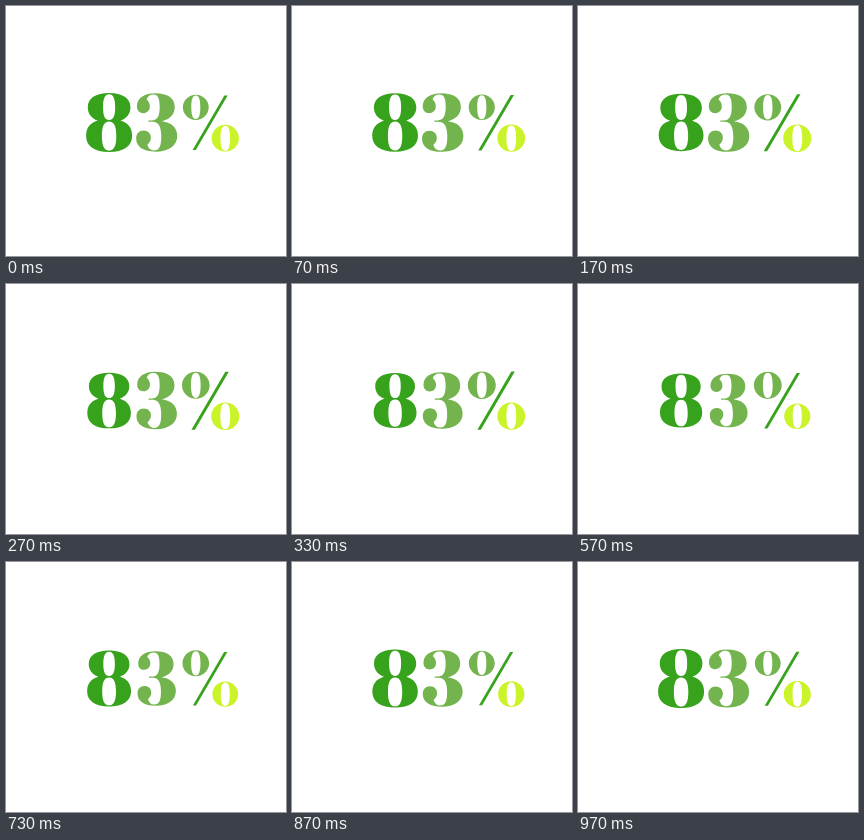
Animation of 280x250 px, one loop 1000 ms. Source, as an HTML page with a canvas:

```html
<!DOCTYPE html>
<html lang="en">
<head>
<meta charset="utf-8">
<title>83%</title>
<style>
  html, body { margin: 0; width: 100%; height: 100%; overflow: hidden; background: #fff; }
  canvas { display: block; }
</style>
</head>
<body>
<canvas id="stage" width="280" height="250" role="img" aria-label="83%"></canvas>
<script>
const ctx = document.getElementById('stage').getContext('2d');
const PERIOD = 1000;
const LAG = 0.112;
const LEAD = 0.012;
const SWING = 0.046;
const GREEN = '#37a21c', SAGE = '#74b44f', LIME = '#caf429';

// Closed oval; tension 0.552 is an ellipse, higher is squarer
function oval(cy, rx, ry, tension = 0.552) {
  const kx = rx * tension, ky = ry * tension;
  const path = new Path2D();
  path.moveTo(0, cy - ry);
  path.bezierCurveTo(kx, cy - ry, rx, cy - ky, rx, cy);
  path.bezierCurveTo(rx, cy + ky, kx, cy + ry, 0, cy + ry);
  path.bezierCurveTo(-kx, cy + ry, -rx, cy + ky, -rx, cy);
  path.bezierCurveTo(-rx, cy - ky, -kx, cy - ry, 0, cy - ry);
  path.closePath();
  return path;
}

// Glyph outlines, each centred on its own origin
const eight = new Path2D(
  'M0-28.1C13-28.1 20.4-23 20.4-14.6C20.4-8.6 17-4 10.8-1.8' +
  'C18.2.2 22 5.2 22 12.8C22 22.5 14 28.1 0 28.1' +
  'C-14 28.1-22 22.5-22 12.8C-22 5.2-18.2.2-10.8-1.8' +
  'C-17-4-20.4-8.6-20.4-14.6C-20.4-23-13-28.1 0-28.1Z');
eight.addPath(oval(-14.7, 5.8, 12.2, 0.68));
eight.addPath(oval(13, 6.9, 13.9, 0.68));

const three = new Path2D(
  'M-1.4-28.1C10.5-28.1 17.4-23.5 17.4-15C17.4-8 13-3.2 5-1.3' +
  'C14.5 0 19.8 5 19.8 13C19.8 22.5 11.5 28.1-1 28.1' +
  'C-13 28.1-19.8 23.5-19.8 15.5C-19.8 10.8-17 7.8-12.6 7.8' +
  'C-8.5 7.8-5.6 10.6-5.6 14.5C-5.6 17.8-7.2 19.6-9 21.4' +
  'C-8 24.8-5.8 26.9-2.5 26.9C2.6 26.9 4.4 22.5 4.4 13.5' +
  'C4.4 4 1.8-.8-4-.8L-8-.8L-8-2L-5-2' +
  'C.8-2 2.9-6.5 2.9-15C2.9-23 1.2-26.9-3-26.9C-6.4-26.9-8.9-25-9.8-22.2' +
  'C-7.8-20.6-6.6-18.4-6.6-15.4C-6.6-11.6-9.4-9-13-9' +
  'C-16.8-9-19.1-11.6-19.1-15.6C-19.1-23.5-12-28.1-1.4-28.1Z');

const slash = new Path2D('M14.6-27.8L17.9-27.8L-14.6 27.8L-17.9 27.8Z');

const ring = oval(0, 13.5, 13.2);
ring.addPath(oval(0, 4.7, 12.3, 0.68));

// Listed in the order the pulse travels
const parts = [
  { path: eight, x: 103.1, y: 116.5, color: GREEN },
  { path: three, x: 150.7, y: 116.5, color: SAGE },
  { path: ring, x: 219.3, y: 132.2, color: LIME },
  { path: slash, x: 204.1, y: 116.7, color: GREEN },
  { path: ring, x: 189.8, y: 101.3, color: SAGE }
];

function draw(now) {
  const phase = (now % PERIOD) / PERIOD + LEAD;
  ctx.setTransform(1, 0, 0, 1, 0, 0);
  ctx.fillStyle = '#fff';
  ctx.fillRect(0, 0, 280, 250);
  parts.forEach(({ path, x, y, color }, i) => {
    const s = 1 + SWING * Math.cos(2 * Math.PI * (phase - i * LAG));
    ctx.setTransform(s, 0, 0, s, x, y);
    ctx.fillStyle = color;
    ctx.fill(path, 'evenodd');
  });
}

const start = performance.now();
function tick() {
  draw(performance.now() - start);
  requestAnimationFrame(tick);
}
tick();
</script>
</body>
</html>
```
